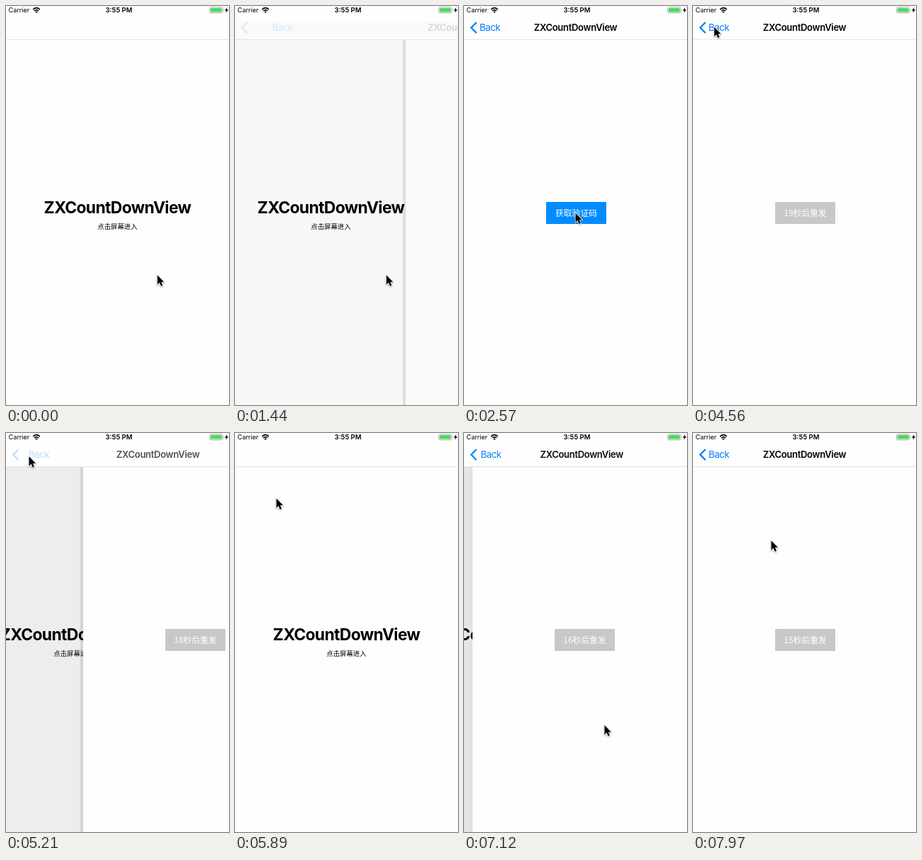
These frames come from a looping animation (315 px wide and 562 px high, 8000 ms). An HTML page:

```html
<!DOCTYPE html>
<html lang="zh">
<head>
<meta charset="utf-8">
<title>Countdown button</title>
<style>
html, body { margin: 0; width: 100%; height: 100%; overflow: hidden; background: #fff; }
#stage {
  position: relative; width: 315px; height: 562px; overflow: hidden; background: #fff;
  font-family: Inter, "Noto Sans CJK SC", "Noto Sans CJK", sans-serif;
  font-optical-sizing: none; color: #000; white-space: nowrap;
}
#stage div, #stage svg { position: absolute; }
.screen { left: 0; top: 48px; width: 315px; height: 514px; background: #fefefe; }
.mid { left: 0; width: 315px; text-align: center; }
#heading { top: 220.5px; font-size: 22.8px; line-height: 30px; font-weight: 700; letter-spacing: -.6px; }
#hint, #button { font-family: "Noto Sans CJK SC", "Noto Sans CJK", sans-serif; }
#hint { top: 255px; font-size: 9.4px; line-height: 15px; }
#dim { inset: 0; background: #000; }
#shade {
  left: -5px; top: 0; width: 5px; height: 514px;
  background: linear-gradient(90deg, #0000, #0000001c 40%, #0000001c);
}
#button {
  left: 116px; top: 228px; width: 85px; height: 31px; line-height: 30px;
  text-align: center; color: #fff; font-size: 11.8px; font-weight: 300;
}
#nav { left: 0; top: 0; width: 315px; height: 47px; background: #fefefe; border-bottom: 1px solid #e2e2e2; }
#tint { left: 0; top: 22px; width: 315px; height: 25px; background: #fafafa; }
#title, #back { top: 20px; line-height: 20px; }
#title { font-size: 13.1px; letter-spacing: -.35px; font-weight: 600; }
#back { left: 22px; font-size: 13.3px; letter-spacing: -.5px; color: #007aff; }
#carrier { left: 3.5px; top: 0; font-size: 9.1px; line-height: 12px; }
#clock { left: 2px; top: 0; font-size: 9.5px; line-height: 12px; font-weight: 600; }
svg { left: 0; top: 0; overflow: visible; }
#cursor { filter: drop-shadow(0 1px 1px #0005); }
</style>
</head>
<body>
<div id="stage">
  <div class="screen" id="root">
    <div class="mid" id="heading">ZXCountDownView</div>
    <div class="mid" id="hint">点击屏幕进入</div>
    <div id="dim"></div>
  </div>
  <div class="screen" id="page">
    <div id="shade"></div>
    <div id="button"></div>
  </div>
  <div id="nav">
    <div id="tint"></div>
    <svg id="chevron" width="30" height="47" fill="none" stroke="#007aff" stroke-width="2.3">
      <path d="M17.6 23 L10.2 30.5 L17.6 38"/>
    </svg>
    <div id="back">Back</div>
    <div class="mid" id="title">ZXCountDownView</div>
    <div id="carrier">Carrier</div>
    <div class="mid" id="clock">3:55 PM</div>
    <svg width="315" height="14">
      <g fill="none" stroke="#000" stroke-width="1.6">
        <path d="M38.2 4.8 Q43 .6 47.8 4.8"/>
        <path d="M40 6.9 Q43 4.3 46 6.9"/>
      </g>
      <path d="M41.3 8.3 Q43 6.9 44.7 8.3 L43 10.1z"/>
      <rect x="287.5" y="1.8" width="18.6" height="8" rx="2" fill="none" stroke="#999" stroke-width=".8"/>
      <rect x="288.8" y="3" width="16" height="5.6" rx="1" fill="#4cd964"/>
      <path d="M307 4.2 Q308.3 5.8 307 7.4z" fill="#999"/>
      <path d="M312.6 1.8 L309 6.4 H311.2 L310.4 9.8 L314.2 5 H311.9z"/>
    </svg>
  </div>
  <svg id="cursor" width="14" height="20">
    <path d="M0 0 V13.4 L3 10.6 L5.2 15.5 L7.5 14.5 L5.4 9.7 H9.5z"
      stroke="#fff" stroke-width="1.6" paint-order="stroke" stroke-linejoin="round"/>
  </svg>
</div>
<script>
const LOOP = 8000, WIDTH = 315, RATE = 0.023;
const PUSHES = [
  [1440, 1510, 1590, 1710, 1830, 1940],
  [6890, 6950, 7010, 7070, 7170, 7270, 7380]
];
const POP = [5150, 5210, 5270, 5350];
const POP_CLEAR = 5830;

// start, end, steps, x, y
const MOVES = [
  [2150, 2150, 1, 194.5, 345.5],
  [2570, 2570, 1, 157.5, 291.5],
  [3830, 4210, 7, 32.5, 29.5],
  [4390, 4390, 1, 27, 26],
  [4450, 4450, 1, 23, 23],
  [4510, 4510, 1, 27, 26],
  [4560, 4560, 1, 30, 29.5],
  [4620, 4910, 4, 32.5, 33],
  [5830, 6240, 8, 198.5, 411.5],
  [7620, 7970, 7, 110.5, 151.5]
];

const el = id => document.getElementById(id);
const [root, page, dim, shade, button, tint, chevron, back, title, cursor] =
  ["root", "page", "dim", "shade", "button", "tint", "chevron", "back", "title", "cursor"].map(el);
const shift = (node, x, y = 0) => node.style.transform = `translate(${x}px, ${y}px)`;
const held = (times, t) => times.filter(s => s <= t).pop();

// Critically damped spring, from 1 down to 0
function spring(ms) {
  const u = Math.max(0, ms) * RATE;
  return (1 + u) * Math.exp(-u);
}

// Share of the width still to slide, for the page and for the bar
function slide(t) {
  if (t < PUSHES[0][0]) return [1, 1];
  if (t >= POP[0] && t < PUSHES[1][0]) {
    const s = held(POP, t);
    return [
      s === POP[3] ? 1 : 1 - spring(s - 5156.8),
      t >= POP_CLEAR ? 1 : 1 - spring(s - 5168)
    ];
  }
  const times = PUSHES[t < POP[0] ? 0 : 1];
  const left = spring(held(times, t) - times[0] + 40);
  return [left, left];
}

function pointer(t) {
  let x = 213.8, y = 379;
  for (const [start, end, steps, toX, toY] of MOVES) {
    if (t < start) break;
    const i = steps > 1 ? Math.floor((t - start) * (steps - 1) / (end - start)) : 0;
    const k = Math.min(steps, i + 1) / steps;
    const e = k * k * (3 - 2 * k);
    x += (toX - x) * e;
    y += (toY - y) * e;
  }
  return [x, y];
}

function draw(t) {
  const [pageLeft, navLeft] = slide(t);
  const x = Math.round(pageLeft * WIDTH), navX = navLeft * WIDTH;
  const fade = Math.pow(1 - navLeft, 1.35);
  const pressed = t >= POP[0] && t < POP_CLEAR ? 0.37 : 1;
  const tinted = x > 200 && x < WIDTH;

  shift(page, x);
  shift(root, Math.round(-0.3 * (WIDTH - x)));
  dim.style.opacity = 0.1 * (1 - pageLeft);
  shade.style.opacity = x < WIDTH ? Math.min(1, x / 100) : 0;
  tint.style.opacity = tinted ? 1 : 0;
  page.style.background = tinted ? "#fafafa" : "#fefefe";

  shift(title, 0.72 * navX);
  shift(back, 0.128 * navX);
  title.style.opacity = fade;
  back.style.opacity = chevron.style.opacity = fade * pressed;

  const counting = t >= 3230;
  const count = 20 - Math.max(0, Math.floor((t - 3270) / 940));
  const label = counting ? count + "秒后重发" : "获取验证码";
  if (button.textContent !== label) button.textContent = label;
  button.style.background = counting ? "#c8c8c8" : "#008cff";

  shift(cursor, ...pointer(t));
}

const begin = performance.now();
function tick() {
  draw((performance.now() - begin) % LOOP);
  requestAnimationFrame(tick);
}
tick();
</script>
</body>
</html>
```
